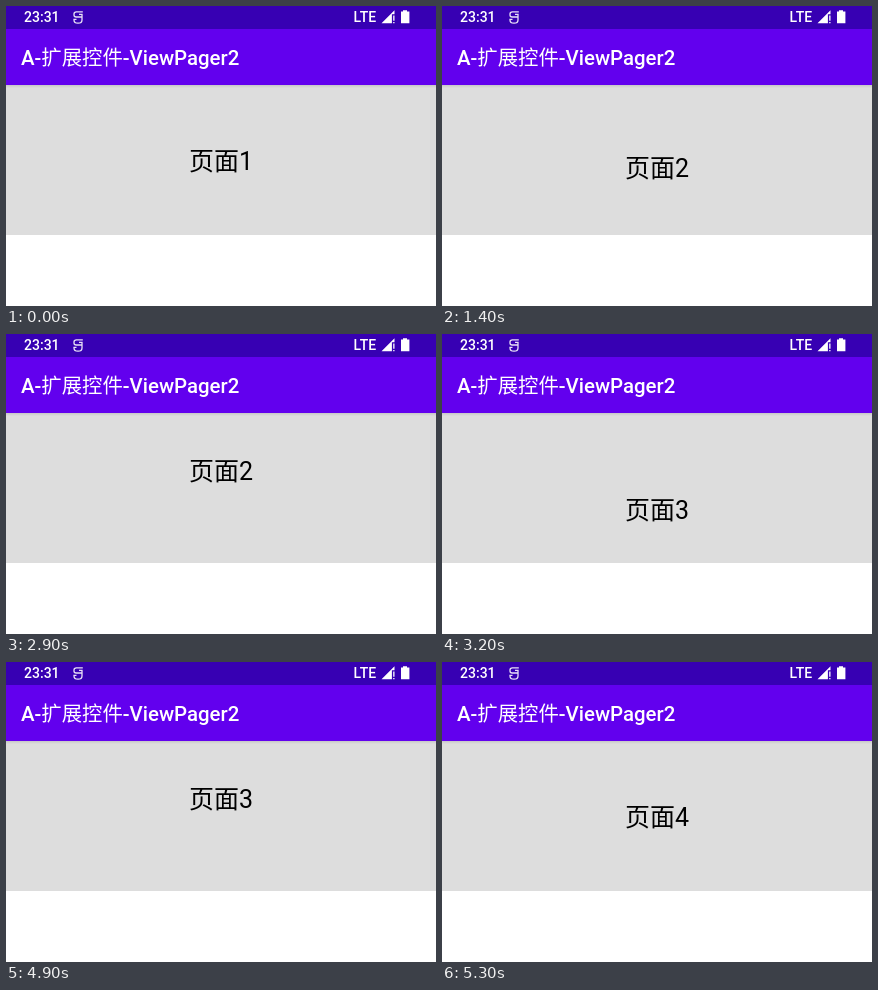
Recreate the animation shown at these times as an HTML page with a canvas. Size 430 px wide and 300 px high, loop 6.1 s.

```html
<!DOCTYPE html>
<html lang="zh-CN">
<head>
<meta charset="utf-8">
<style>
  html, body { margin: 0; width: 100%; height: 100%; overflow: hidden; background: #fff; }
  canvas { display: block; }
</style>
</head>
<body>
<canvas id="stage" width="430" height="300"></canvas>
<script>
const ctx = document.getElementById('stage').getContext('2d');
const LATIN = 'Roboto, sans-serif';
const HAN = '"Noto Sans CJK SC", "Noto Sans CJK", sans-serif';
const LOOP = 6100, STEP = 100;
const PAGER = { top: 79, height: 150 };

// Each swipe: start time and the scrolled distance at every 100 ms step.
const swipes = [
  { start: 1200, offsets: [31, 104, 143, 150] },
  { start: 2900, offsets: [18.5, 61, 104, 129, 142, 148, 150] },
  { start: 4900, offsets: [18.5, 82, 126, 145, 150] }
];

function rect(x, y, w, h, color) {
  ctx.fillStyle = color;
  ctx.fillRect(x, y, w, h);
}

function shape(path, x = 0, y = 0, scale = 1) {
  ctx.save();
  ctx.translate(x, y);
  ctx.scale(scale, scale);
  ctx.fillStyle = '#fff';
  ctx.fill(new Path2D(path));
  ctx.restore();
}

// Draws [text, font] runs one after another.
function runs(parts, x, y, color) {
  ctx.fillStyle = color;
  for (const [text, font] of parts) {
    ctx.font = font;
    ctx.fillText(text, x, y);
    x += ctx.measureText(text).width;
  }
}

function statusBar() {
  rect(0, 0, 430, 23, '#3700b3');
  const font = `500 14px ${LATIN}`;
  runs([['23:31', font]], 18, 16, '#fff');
  runs([['LTE', font]], 347.5, 16, '#fff');

  // notification
  ctx.strokeStyle = '#e8e0f6';
  ctx.lineWidth = 1.3;
  ctx.stroke(new Path2D(
    'M76.8 5.8H70.4Q68 5.8 68 8V9Q68 11 70.2 11H76V14Q76 17.2 72 17.2Q68 17.2 68 14V13.4H70.5M76 11V8.4H73'));

  // signal without internet, battery
  shape('M2 22H18V8H22V2ZM20 22H22V20H20ZM20 10V18H22V10Z', 374.2, 3, 0.65);
  shape('M397 4.3H401V5.6H403.4V17.3H395V5.6H397Z');
}

function titleBar() {
  rect(0, 23, 430, 56, '#6200ee');
  const font = `500 20.4px ${LATIN}`;
  runs([['A-', font], ['扩展控件', `400 20.4px ${HAN}`], ['-ViewPager2', font]], 15, 58.5, '#fff');

  const shadow = ctx.createLinearGradient(0, 79, 0, 82);
  shadow.addColorStop(0, 'rgba(0, 0, 0, 0.1)');
  shadow.addColorStop(1, 'rgba(0, 0, 0, 0)');
  rect(0, 79, 430, 3, shadow);
}

function scrollAt(t) {
  let scroll = 0;
  for (const { start, offsets } of swipes) {
    if (t < start) break;
    const i = Math.min(Math.floor((t - start) / STEP), offsets.length - 1);
    scroll += offsets[i];
  }
  return scroll;
}

function pager(t) {
  const { top, height } = PAGER;
  const scroll = scrollAt(t);
  ctx.save();
  ctx.beginPath();
  ctx.rect(0, top, 430, height);
  ctx.clip();
  rect(0, top, 430, height, '#dddddd');
  for (let i = 0; i < 4; i++) {
    const y = top + i * height - scroll;
    if (Math.abs(y - top) >= height) continue;
    runs([['页面', `400 25px ${HAN}`], [String(i + 1), `400 25px ${LATIN}`]], 183, y + 85, '#000');
  }
  ctx.restore();
}

const origin = performance.now();
function draw(now) {
  const t = Math.max(0, now - origin) % LOOP;
  rect(0, 0, 430, 300, '#fff');
  pager(t);
  statusBar();
  titleBar();
  requestAnimationFrame(draw);
}
requestAnimationFrame(draw);
</script>
</body>
</html>
```
